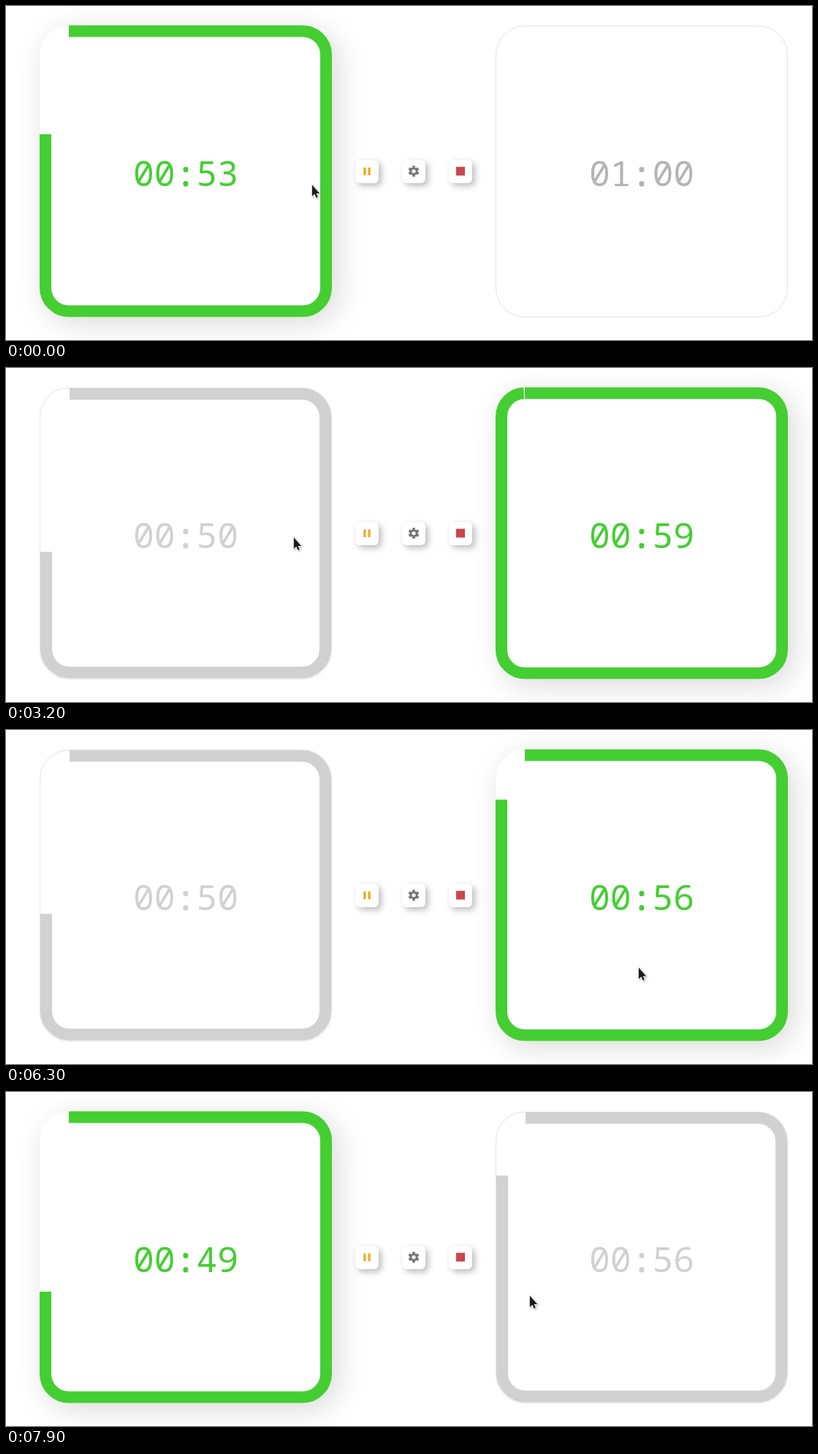
Recreate the animation shown at these times as an HTML page. Size 1103 by 458 pixels, loop 8 s.

```html
<!DOCTYPE html>
<html lang="en">
<head>
<meta charset="utf-8">
<title>Two timers</title>
<style>
html, body { margin: 0; width: 100%; height: 100%; overflow: hidden; background: #fff; }
.panel, .button { position: absolute; box-sizing: border-box; background: #fff; }
.panel { top: 27px; width: 400px; height: 400px; border-radius: 40px; color: #b4b4b4; border: 1px solid #e2e2e2; }
.panel.paused { color: #d1d1d1; }
.panel.active { color: #44ce32; border: 0; box-shadow: 8px 8px 40px rgba(0, 0, 0, .15); }
.panel svg { position: absolute; left: 0; top: 0; width: 100%; height: 100%; overflow: visible; }
.panel path { fill: none; stroke: currentColor; stroke-width: 16; }
.panel text { font: 48px "Noto Sans Mono", monospace; fill: currentColor; text-anchor: middle; }
.panel .colon { stroke: currentColor; stroke-width: 1.2; }
.button { top: 211px; width: 32px; height: 32px; border-radius: 6px; box-shadow: 4px 4px 8px rgba(0, 0, 0, .25), 0 0 3px rgba(0, 0, 0, .05); }
.button svg { display: block; }
.panel svg, .button svg { transform: translateY(-.5px); }
#cursor { position: absolute; left: 0; top: 0; overflow: visible; filter: drop-shadow(1px 1px 1px rgba(0, 0, 0, .3)); }
</style>
</head>
<body>
<div class="panel" id="left" style="left:46px"><svg><path/><text><tspan></tspan><tspan class="colon">:</tspan><tspan></tspan></text></svg></div>
<div class="panel" id="right" style="left:670px"><svg><path/><text><tspan></tspan><tspan class="colon">:</tspan><tspan></tspan></text></svg></div>

<div class="button" style="left:478px"><svg width="32" height="32">
  <path d="M11.3 11h3.2v10.5h-3.2zM17.5 11h3.2v10.5h-3.2z" fill="#f2a71b"/>
</svg></div>
<div class="button" style="left:542px"><svg width="32" height="32">
  <g fill="none" stroke="#757575" transform="rotate(-90 16 16)">
    <circle cx="16" cy="16" r="4.1" stroke-width="3"/>
    <circle cx="16" cy="16" r="6.3" stroke-width="2.4" pathLength="60" stroke-dasharray="5.6 4.4" stroke-dashoffset="2.8"/>
  </g>
</svg></div>
<div class="button" style="left:606px"><svg width="32" height="32">
  <path d="M10 10h12v12H10z" fill="#c9464c"/>
</svg></div>

<svg id="cursor" width="12" height="20">
  <path d="M0 0V15.7L3.5 12.6 5.8 17.8 8 16.8 5.8 11.8H10.4Z" fill="#1c1c1c" stroke="#fff" stroke-width="1.6" paint-order="stroke"/>
</svg>

<script>
const LOOP = 8, TOTAL = 60;
const SWAP = 3.1, BACK = 7.04;   // seconds at which the running timer changes
const RATE = 1.017;

// Pointer path: start, end, from, to
const moves = [
  [1.7, 2.6, [418.8, 245.2], [393.8, 232.2]],
  [5.5, 6.25, [393.8, 232.2], [865.8, 325.7]],
  [6.3, 6.95, [865.8, 325.7], [737.8, 278.2]],
  [7.2, 7.6, [737.8, 278.2], [716.8, 279.2]],
];

const clamp = (v, lo, hi) => Math.min(hi, Math.max(lo, v));
const ease = u => u * u * (3 - 2 * u);
const pad = n => String(n).padStart(2, '0');

function pointer(t) {
  let pos = moves[0][2];
  for (const [start, end, from, to] of moves) {
    if (t < start) break;
    const u = ease(clamp((t - start) / (end - start), 0, 1));
    pos = from.map((v, i) => v + (to[i] - v) * u);
  }
  return pos;
}

function drawPanel(id, state, elapsed) {
  const panel = document.getElementById(id);
  const [ring, label] = panel.firstChild.children;
  const [minutes, , seconds] = label.children;
  const border = state === 'active' ? 0 : 1;
  const side = 320 - 2 * border;
  const length = 4 * side + 64 * Math.PI;
  const arc = (x, y) => `a32 32 0 0 1 ${x} ${y}`;
  panel.className = 'panel ' + state;
  ring.setAttribute('d', `M40 8h${side}${arc(32, 32)}v${side}${arc(-32, 32)}` +
    `h${-side}${arc(-32, -32)}v${-side}${arc(32, -32)}`);
  ring.setAttribute('stroke-dasharray', `${length * (1 - elapsed / TOTAL)} ${length}`);
  ring.style.display = state === 'idle' ? 'none' : '';
  const left = Math.floor(TOTAL - elapsed);
  minutes.textContent = pad(Math.floor(left / 60));
  seconds.textContent = pad(left % 60);
  label.setAttribute('x', 200 - border);
  label.setAttribute('y', 220 - border);
}

function frame(now) {
  const t = now / 1000 % LOOP;
  const swapped = t >= SWAP && t < BACK;
  const leftTime = 6.47 + Math.min(t, SWAP) + Math.max(0, t - BACK) * RATE;
  const rightTime = Math.max(0, Math.min(t, BACK) - 3.135) * RATE;
  drawPanel('left', swapped ? 'paused' : 'active', leftTime);
  drawPanel('right', t < SWAP ? 'idle' : swapped ? 'active' : 'paused', rightTime);
  const [x, y] = pointer(t);
  document.getElementById('cursor').style.transform = `translate(${x}px, ${y}px)`;
  requestAnimationFrame(frame);
}
frame(0);
</script>
</body>
</html>
```
